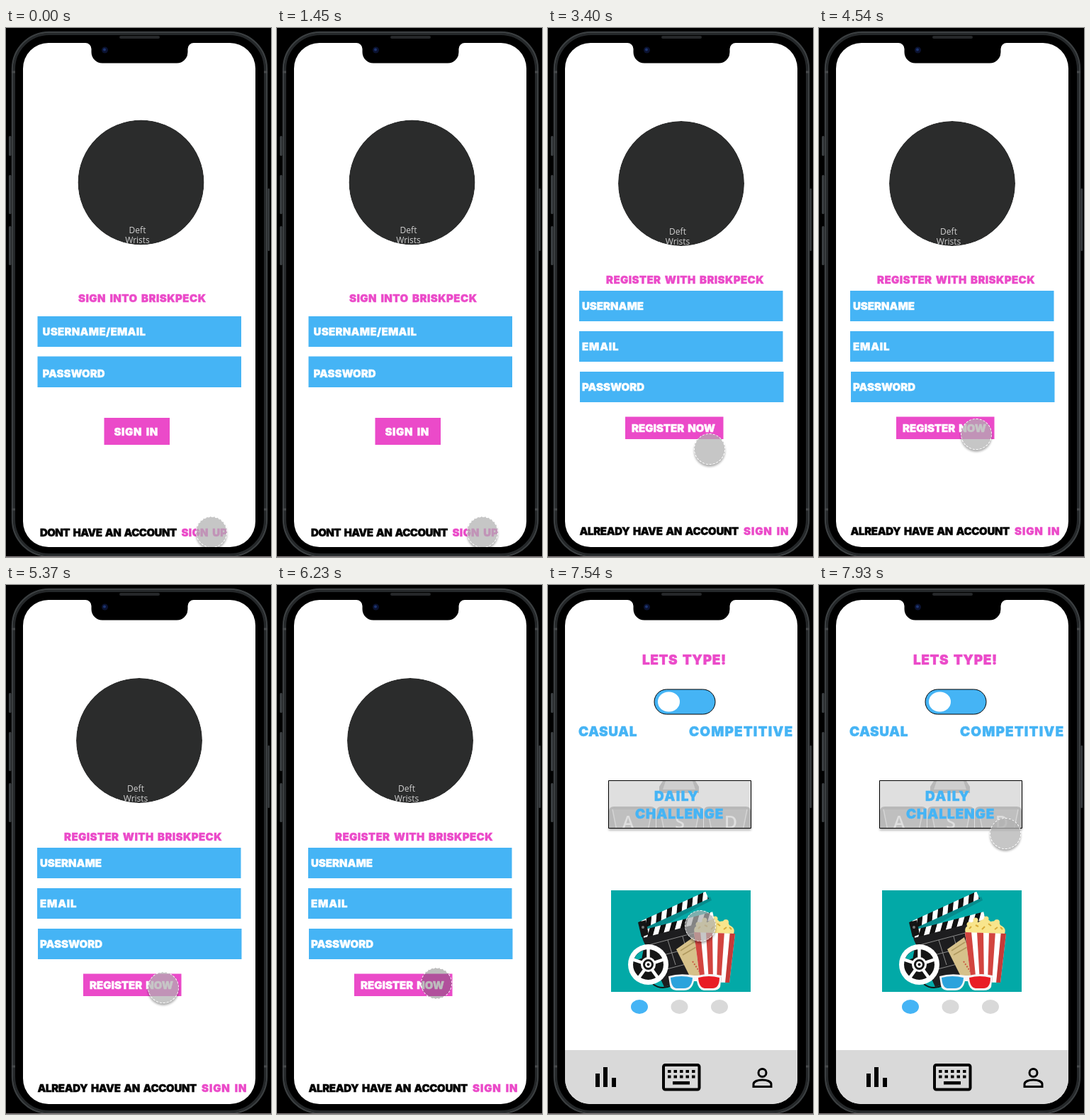
Recreate the animation shown at these times as an HTML page. Size 374x745 px, loop 8 s.

```html
<!DOCTYPE html>
<html lang="en">
<head>
<meta charset="utf-8">
<title>Typing game app</title>
<style>
  html, body { margin: 0; width: 100%; height: 100%; overflow: hidden; background: #000; }
  svg { position: absolute; left: 0; top: 0; display: block; }

  .t { font: 900 15px Inter, Roboto, sans-serif; stroke-width: .4; word-spacing: 2px; }
  .big { font-size: 19px; }
  .logo text { font: 12px "Open Sans", Lato, sans-serif; fill: #d0d0d0; text-anchor: middle; }
  .keys text { font: 600 25px "Open Sans", sans-serif; fill: #dedede; text-anchor: middle; }
  .pink { fill: #eb4ac9; }
  .blue { fill: #45b4f5; }
  .white { fill: #fff; }
  text.pink { stroke: #eb4ac9; }
  text.blue { stroke: #45b4f5; }
  text.white { stroke: #fff; }
  text.black { stroke: #000; }

  .page { visibility: hidden; animation: 8s step-end infinite; }
  .signin { animation-name: signin; }
  .register { animation-name: register; }
  .home { animation-name: home; }
  @keyframes signin { 0% { visibility: visible } 32.125%, 100% { visibility: hidden } }
  @keyframes register { 0% { visibility: hidden } 32.125% { visibility: visible } 81.75%, 100% { visibility: hidden } }
  @keyframes home { 0% { visibility: hidden } 81.75%, 100% { visibility: visible } }

  .touch-area {
    position: absolute; left: 24px; top: 21px; width: 328px; height: 710px;
    overflow: hidden; border-radius: 36px;
  }
  .touch {
    position: absolute; left: -46px; top: -43px; width: 44px; height: 44px;
    box-sizing: border-box; border: 1px dashed #fff; border-radius: 50%;
    animation: move 8s step-end infinite, press 8s step-end infinite;
  }
  @keyframes move {
    0% { transform: translate(290px, 710px) }
    38.875% { transform: translate(287px, 701px) }
    40.75% { transform: translate(237px, 612px) }
    42.5% { transform: translate(228px, 593px) }
    44% { transform: translate(222px, 584px) }
    52.75% { transform: translate(222px, 578px) }
    54.75% { transform: translate(222px, 575px) }
    56.75% { transform: translate(222px, 572px) }
    67.125% { transform: translate(222px, 567px) }
    69% { transform: translate(225px, 561px) }
    92.375% { transform: translate(223px, 536px) }
    94.25% { transform: translate(215px, 480px) }
    95.75% { transform: translate(222px, 428px) }
    97.625% { transform: translate(243px, 384px) }
    99.125%, 100% { transform: translate(263px, 350px) }
  }
  @keyframes press {
    0%, 18.125%, 81.75%, 100% {
      background-color: rgba(177, 177, 177, .72);
      box-shadow: 0 3px 3px rgba(0, 0, 0, .3);
    }
    14.625%, 77.875% { background-color: rgba(90, 90, 90, .4); box-shadow: none; }
  }
</style>
</head>
<body>
<svg width="374" height="745" viewBox="0 0 374 745">
  <defs>
    <clipPath id="screen"><rect x="24" y="21" width="328" height="710" rx="36"/></clipPath>
    <clipPath id="disc"><ellipse cx="190.500" cy="217.500" rx="89" ry="88"/></clipPath>
    <clipPath id="tub"><path d="M206 489 264 491 256 560 215 559Z"/></clipPath>
    <clipPath id="card"><path d="M86 276H286V342.500H86Z"/></clipPath>
    <pattern id="stripes" width="16" height="12" patternUnits="userSpaceOnUse" patternTransform="skewX(-30)">
      <path d="M0 0H16V12H0Z" fill="#111"/>
      <path d="M0 0H8V12H0Z" fill="#fff"/>
    </pattern>
    <filter id="soft" x="-10%" y="-10%" width="120%" height="140%">
      <feDropShadow dx="0" dy="3" stdDeviation="1.500" flood-opacity=".3"/>
    </filter>
    <g id="logo" class="logo" clip-path="url(#disc)">
      <ellipse cx="190.500" cy="217.500" rx="89" ry="88" fill="#2b2c2c"/>
      <text x="185.500" y="289">Deft</text>
      <text x="185.500" y="303">Wrists</text>
    </g>
    <g id="key">
      <path d="M-33 34V7Q-33 0-26 0H26Q33 0 33 7V34Z" fill="#b8b8b8"/>
      <path d="M-28 4-22 34H22L28 4" fill="#bfbfbf" stroke="#d4d4d4" stroke-width="1.500"/>
    </g>
  </defs>

  <!-- phone body -->
  <path d="M0 0H374V745H0Z"/>
  <g fill="#3a3e41">
    <rect x="4" y="152" width="3.500" height="28" rx="1.500"/>
    <rect x="4" y="207" width="3.500" height="55" rx="1.500"/>
    <rect x="4" y="279" width="3.500" height="55" rx="1.500"/>
    <rect x="369.500" y="226" width="2.500" height="88" rx="1"/>
  </g>
  <g fill="none">
    <rect x="9" y="6" width="359" height="738" rx="52" stroke="#3b3f41" stroke-width="2.500"/>
    <rect x="11.500" y="8.500" width="354" height="733" rx="49.500" stroke="#25282a" stroke-width="3"/>
    <path d="M8 62H13M364 62H369M8 678H13M364 678H369" stroke="#46494b" stroke-width="3"/>
  </g>
  <rect x="160" y="11" width="57" height="4" rx="2" fill="#26282a"/>
  <path d="M0 744H374V745H0Z" fill="#8a8082"/>

  <g clip-path="url(#screen)">
    <path class="white" d="M24 21H353V732H24Z"/>

    <g class="page signin">
      <use href="#logo"/>
      <text class="t pink" x="102" y="386" letter-spacing=".45">SIGN INTO BRISKPECK</text>
      <path class="blue" d="M44.500 406H332V449H44.500ZM44.500 462.500H332V506H44.500Z"/>
      <text class="t white" x="51.500" y="433" letter-spacing=".3">USERNAME/EMAIL</text>
      <text class="t white" x="51.500" y="492">PASSWORD</text>
      <path class="pink" d="M138.500 549H231V587H138.500Z"/>
      <text class="t white" x="152.500" y="573.500" letter-spacing=".6">SIGN IN</text>
      <text class="t black" x="48" y="715.500" letter-spacing="-.55">DONT HAVE AN ACCOUNT</text>
      <text class="t pink" x="247.500" y="715.500" letter-spacing=".3">SIGN UP</text>
    </g>

    <g class="page register">
      <use href="#logo" x="-2.500" y="1.500"/>
      <text class="t pink" x="82" y="360" letter-spacing=".4">REGISTER WITH BRISKPECK</text>
      <path class="blue" d="M44 370H331.500V413H44ZM44 427H331.500V470H44ZM45 484H332.500V527H45Z"/>
      <text class="t white" x="48" y="397">USERNAME</text>
      <text class="t white" x="48" y="454" letter-spacing=".8">EMAIL</text>
      <text class="t white" x="48" y="511">PASSWORD</text>
      <path class="pink" d="M109 547.500H247.500V579H109Z"/>
      <text class="t white" x="118" y="568.500">REGISTER NOW</text>
      <text class="t black" x="44.500" y="714" letter-spacing="-.35">ALREADY HAVE AN ACCOUNT</text>
      <text class="t pink" x="276" y="714" letter-spacing=".9">SIGN IN</text>
    </g>

    <g class="page home">
      <text class="t big pink" x="133" y="111.500" letter-spacing=".6">LETS TYPE!</text>
      <rect class="blue" x="150" y="147" width="86" height="35" rx="17.500" stroke="#000"/>
      <ellipse class="white" cx="170.500" cy="164.500" rx="15.500" ry="14"/>
      <text class="t big blue" x="43" y="212.500" letter-spacing=".5">CASUAL</text>
      <text class="t big blue" x="199" y="212.500" letter-spacing="1.1">COMPETITIVE</text>

      <path d="M85.500 275.500H286.500V342.500H85.500Z" fill="#dfdfdf" filter="url(#soft)"/>
      <g class="keys" clip-path="url(#card)">
        <path d="M157 293V284L162 276H208L213 284V293Z" fill="#b8b8b8"/>
        <path d="M166 276H204L208 288H162Z" fill="#cecece"/>
        <use href="#key" x="119" y="312"/>
        <use href="#key" x="186" y="312"/>
        <use href="#key" x="253" y="312"/>
        <text x="113" y="343">A</text>
        <text x="186" y="343">S</text>
        <text x="258" y="343">D</text>
      </g>
      <path d="M85.500 275.500H286.500V342.500H85.500Z" fill="none" stroke="#000"/>
      <text class="t big blue" x="150" y="304" letter-spacing="1.4">DAILY</text>
      <text class="t big blue" x="123" y="328.500" letter-spacing=".9">CHALLENGE</text>

      <!-- cinema picture -->
      <path d="M89 430H286V573H89Z" fill="#02a9a7"/>
      <path d="M137 483 229 439 231 444 150 486Z" fill="#078b8c"/>
      <path d="M128 476 136 474 140 488 234 465 226 548 164 566 134 500Z" fill="#1d1d1f"/>
      <path d="M138 508 214 488M143 526 211 509M152 545 206 531M169 500 180 535M190 495 196 516" fill="none" stroke="#8b8b8b" stroke-width="1"/>
      <g fill="url(#stripes)">
        <path d="M0-6H103V5H0Z" transform="translate(131 480) rotate(-24.500)"/>
        <path d="M0-6H103V5H0Z" transform="translate(134 492) rotate(-14.600)"/>
      </g>
      <path d="M127 475 138 472 142 492 132 496Z" fill="#151515"/>
      <circle cx="134" cy="482" r="2" fill="#777"/>

      <path d="M181 513 205 496 223 547 203 557Z" fill="#d6c18a"/>
      <path d="M187 515 206 503M190 521 209 510" stroke="#af995f" stroke-width="1.500"/>
      <path d="M204 530 216 548" stroke="#c95b43" stroke-width="2" stroke-dasharray="2 2"/>

      <path d="M148 562Q160 571 174 564" fill="none" stroke="#151515" stroke-width="2"/>
      <g transform="translate(141.500 534.500)">
        <circle class="white" r="28.500"/>
        <circle r="21.500" fill="#151515"/>
        <path d="M-21-4A21.500 21.500 0 0 1-7-20L-9-9Z" fill="#02a9a7"/>
        <g fill="none" stroke="#fff" stroke-width="4.500">
          <path id="spoke" d="M0-8V-23"/>
          <use href="#spoke" transform="rotate(72)"/>
          <use href="#spoke" transform="rotate(144)"/>
          <use href="#spoke" transform="rotate(216)"/>
          <use href="#spoke" transform="rotate(288)"/>
        </g>
        <circle r="9" fill="#151515" stroke="#fff" stroke-width="3"/>
        <circle class="white" r="4.500"/>
        <circle r="2" fill="#151515"/>
      </g>

      <g fill="#f8e58c">
        <path d="M207 490Q204 482 212 479Q215 472 225 475Q235 466 242 474Q253 471 256 479Q265 483 262 491Z"/>
        <circle cx="221" cy="472" r="3.500"/>
        <circle cx="236" cy="470" r="3.500"/>
        <circle cx="251" cy="475" r="4"/>
        <circle cx="212" cy="478" r="3.500"/>
      </g>
      <path d="M212 484l3-3M221 479l4 2M230 485l4-4M239 477l4 3M248 485l4-3M256 482l3 3" stroke="#d9ac38" stroke-width="2"/>
      <g clip-path="url(#tub)">
        <path class="white" d="M204 487H266V562H204Z"/>
        <path d="M205 488H215L222 561H214ZM223 488H232L233 561H227ZM240 488H249L244 561H238ZM257 488H266L258 561H250Z" fill="#d2443f"/>
        <path d="M257 488H266L257 562H250Z" fill="#a82d2b" opacity=".35"/>
      </g>

      <path d="M170 551Q187 546 206 550H211Q229 546 245 550L243 566Q241 571 232 571H220Q212 570 210 558H206Q203 571 192 571H181Q173 570 172 564Z" fill="#f6f6f6"/>
      <path d="M173 553Q188 549 204 553Q203 568 192 568H181Q174 567 173 553Z" fill="#2ba3dc"/>
      <path d="M212 553Q227 549 242 553Q242 568 232 568H221Q213 567 212 553Z" fill="#e91d25"/>

      <g fill="#d9d9d9">
        <ellipse class="blue" cx="129" cy="594" rx="12" ry="10"/>
        <ellipse cx="185.500" cy="594" rx="12" ry="10"/>
        <ellipse cx="242" cy="594" rx="12" ry="10"/>
        <path d="M24 655H353V732H24Z"/>
      </g>
      <path d="M67 688H73V707H67ZM78 679H84V707H78ZM90 694H96V707H90Z"/>
      <rect x="163" y="676" width="50.500" height="34.500" rx="2.500" fill="none" stroke="#000" stroke-width="4"/>
      <path d="M169 685H208M169 692.500H208" stroke="#000" stroke-width="4" stroke-dasharray="4.500 4"/>
      <path d="M176 699H200V703.500H176Z"/>
      <g fill="none" stroke="#000" stroke-width="3">
        <circle cx="302.500" cy="687" r="5.500"/>
        <path d="M290 706.500V703C290 695 315 695 315 703V706.500Z"/>
      </g>
    </g>

    <path d="M112 21A8.500 8.500 0 0 1 120.500 29.500V34A15.500 15.500 0 0 0 136 49.500H241A15.500 15.500 0 0 0 256.500 34V29.500A8.500 8.500 0 0 1 265 21Z"/>
  </g>
  <circle cx="139.500" cy="31" r="4.500" fill="#0b1230"/>
  <circle cx="139" cy="30.500" r="2" fill="#1c3470"/>
</svg>
<div class="touch-area"><div class="touch"></div></div>
</body>
</html>
```
